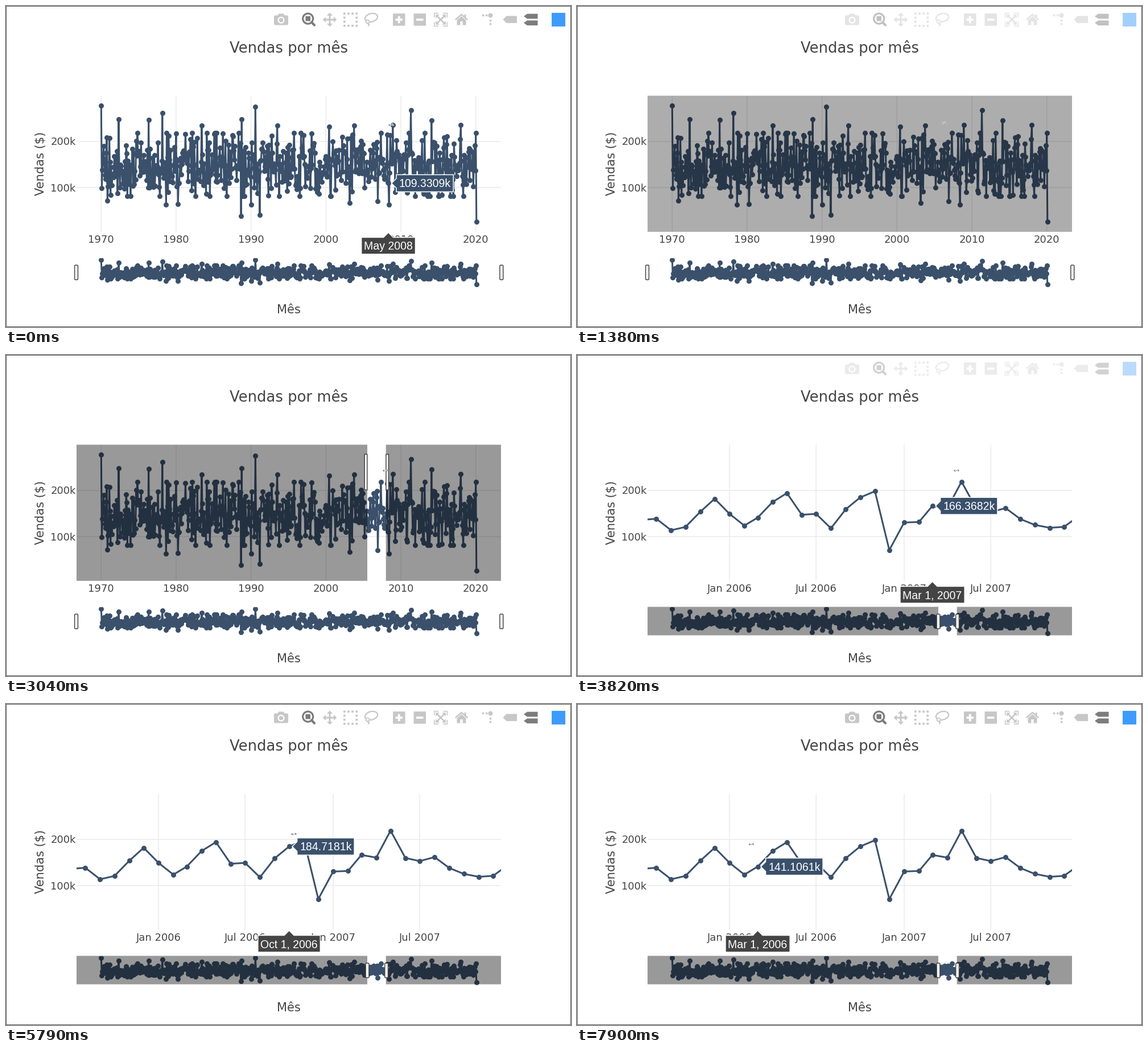
These frames come from a looping animation (993 by 564 pixels, 8 s). A matplotlib script:

```python
import numpy as np
import matplotlib.pyplot as plt
from matplotlib.animation import FuncAnimation
from matplotlib.patches import Circle, Ellipse, FancyBboxPatch, Polygon, Rectangle

plt.rcParams["path.snap"] = False

W, H, DPI = 993, 564, 64
STEP, LOOP = 40, 8000
PT = 72 / DPI
LEFT, RIGHT, TOP, BOTTOM = 124, 870, 157.6, 396.8
SL_TOP, SL_BOTTOM = 442.5, 492.5
WIN = 635, 667.7
BLUE, INK, GRID = "#3a506b", "#444444", "#ebebeb"
PALE, DARK = "#c7c7c7", "#7c7c7c"
NAMES = "Jan Feb Mar Apr May Jun Jul Aug Sep Oct Nov Dec".split()

# ---------- data: monthly sales in thousands, Jan 1970 to Feb 2020 ----------
months = np.arange("1970-01", "2020-03", dtype="datetime64[M]")
days = months.astype("datetime64[D]").astype(int)
rng = np.random.default_rng(5)
sales = np.clip(rng.normal(148, 37, len(months)), 82, 218).round(4)

# outstanding highs and lows
for month, k in {0: 278, 10: 72, 28: 248, 76: 247, 98: 262, 104: 63, 123: 64, 161: 235,
                 224: 38, 225: 248, 240: 63, 247: 275, 254: 41, 282: 235, 365: 232,
                 398: 67, 405: 235, 461: 63, 467: 236, 496: 268, 529: 246, 576: 236,
                 601: 26}.items():
    sales[month] = k

# the stretch that is zoomed into, from Jul 2005
NEAR = slice(426, 457)
run = np.array([136, 139, 114, 121, 154, 182, 149, 124, 141.1061, 175, 194, 147.2998, 149,
                117.924, 159, 185, 198, 71, 130.4579, 132, 166.3682, 161, 219, 160, 153,
                162, 138, 125, 119, 121, 144])
sales[NEAR] = np.where(run % 1, run, run + rng.uniform(-0.4, 0.4, len(run)).round(4))
sales[460] = 109.3309

x_full = 167.3 + days * 658.4 / 18262
x_zoom = 268 + (days - 13149) * 0.841
y_main = 400 - 0.81 * sales
y_slider = 446 + (y_main - 175) * 0.211

# ---------- pointer: it moves in bursts of equal steps that end at each key ----------
BEAT = 120
keys = [  # end time, steps, hovered month, x, y
    (0, 1, 460, 677, 209), (540, 3, 440, 649, 209), (840, 2, 424, 634, 206),
    (1230, 1, 424, 643, 205.5), (1740, 4, 424, 651, 204), (2400, 5, 424, 659, 203),
    (3040, 4, 424, 667, 203), (3820, 1, 446, 667, 203), (4670, 1, 448, 659, 204),
    (5030, 3, 444, 585.5, 217.5), (5400, 1, 444, 563, 217.5), (5790, 3, 441, 506, 228.5),
    (6300, 4, 439, 437, 235), (6570, 2, 437, 393, 239.5), (7320, 3, 435, 338, 243),
    (7900, 3, 434, 306.5, 246.5),
]


def pointer_at(t):
    """Hovered month and pointer position at time t."""
    state = np.array(keys[0][2:], float)
    for end, steps, *goal in keys[1:]:
        done = np.clip((t - end) // BEAT + steps, 0, steps)
        state = state + (np.array(goal) - state) * done / steps
    return int(round(state[0])), state[1], state[2]


# ---------- stage ----------
fig = plt.figure(figsize=(W / DPI, H / DPI), dpi=DPI, facecolor="white")
ax = fig.add_axes([0, 0, 1, 1])
ax.set_xlim(0, W)
ax.set_ylim(H, 0)
ax.axis("off")


def add(patch):
    ax.add_patch(patch)
    return patch


def box(x, y, w, h, color, r=0.0, z=2, edge="none", lw=0.0, alpha=None):
    style = dict(fc=color, ec=edge, lw=lw * PT, zorder=z, alpha=alpha)
    if r:
        return add(FancyBboxPatch((x, y), w, h, boxstyle=f"round,pad=0,rounding_size={r}", **style))
    return add(Rectangle((x, y), w, h, **style))


def poly(pts, color, z=2, edge="none", lw=0.0):
    return add(Polygon(pts, closed=True, fc=color, ec=edge, lw=lw * PT, zorder=z, joinstyle="miter"))


def disc(x, y, r, color):
    return add(Circle((x, y), r, fc=color, ec="none", zorder=2))


def stroke(xs, ys, color, lw, z=2, cap="butt"):
    return ax.plot(xs, ys, color=color, lw=lw * PT, zorder=z,
                   solid_capstyle=cap, solid_joinstyle="round")[0]


def label(x, y, s, size, ha="center", color=INK, font="DejaVu Sans", z=2, rot=0):
    return ax.text(x, y, s, fontsize=size * PT, ha=ha, va="baseline", color=color,
                   family=font, zorder=z, rotation=rot, rotation_mode="anchor")


def series(xs, ys, top, bottom):
    line = ax.plot(xs, ys, color=BLUE, lw=3 * PT, marker="o", ms=9 * PT, mew=0, zorder=2)[0]
    line.set_clip_path(Rectangle((LEFT, top), RIGHT - LEFT, bottom - top, transform=ax.transData))
    return line


def show(items, on):
    for item in items:
        item.set_visible(on)


def draw_toolbar():
    # camera
    box(471, 16.5, 25, 17, PALE, 2.5)
    poly([(477, 17), (479.5, 13.5), (487.5, 13.5), (490, 17)], PALE)
    disc(483.5, 24.8, 6, "white")
    disc(483.5, 24.8, 3.8, PALE)
    # magnifier, selected
    add(Circle((530.7, 22.2), 9, fc="none", ec=DARK, lw=3.2 * PT, zorder=2))
    box(526.4, 17.9, 8.6, 8.6, DARK)
    stroke([537, 542], [28.5, 33.7], DARK, 4.2, cap="round")
    # pan
    stroke([560, 578], [24, 24], PALE, 3)
    stroke([569, 569], [15, 33], PALE, 3)
    for a in np.arange(4) * np.pi / 2:
        c, s = np.cos(a), np.sin(a)
        head = [(12.3, 0), (7, -5), (7, 5)]
        poly([(569 + c * u - s * v, 24 + s * u + c * v) for u, v in head], PALE)
    # dotted selection box
    for i in range(4):
        for j in range(4):
            if i in (0, 3) or j in (0, 3):
                box(593 + 7.15 * i, 11.5 + 7.15 * j, 3.6, 3.6, PALE)
    # lasso
    add(Ellipse((642, 20.5), 22.5, 14.5, angle=-14, fc="none", ec=PALE, lw=2.3 * PT, zorder=2))
    add(Circle((635.5, 27.5), 3, fc="white", ec=PALE, lw=1.8 * PT, zorder=2))
    stroke([635, 638, 637], [30, 32.5, 35.5], PALE, 2.2)
    # plus and minus
    for x in (680, 716.5):
        box(x, 13.2, 21.5, 21.5, PALE, 1)
        stroke([x + 4.5, x + 17], [24, 24], "white", 3.8)
    stroke([690.75, 690.75], [17.7, 30.3], "white", 3.8)
    # autoscale
    for sx in (-1, 1):
        for sy in (-1, 1):
            stroke([764 + 4 * sx, 764 + 11.3 * sx, 764 + 11.3 * sx],
                   [24 + 11.3 * sy, 24 + 11.3 * sy, 24 + 4 * sy], PALE, 1.6)
            stroke([764, 764 + 6 * sx], [24, 24 + 6 * sy], PALE, 2.6)
            poly([(764 + 8.8 * sx, 24 + 8.8 * sy), (764 + 2.2 * sx, 24 + 8.8 * sy),
                  (764 + 8.8 * sx, 24 + 2.2 * sy)], PALE)
    # home
    stroke([789.8, 800.5, 811.2], [24.2, 15, 24.2], PALE, 2.6)
    poly([(792.5, 25), (800.5, 18), (808.5, 25), (808.5, 33.5), (792.5, 33.5)], PALE)
    box(798.3, 27, 4.4, 6.5, "white")
    box(805.5, 15, 3, 6, PALE)
    # spike lines
    for x, y in [(837, 14.8), (843, 14.8), (849.8, 24), (849.8, 30)]:
        box(x, y, 3.4, 3.4, PALE)
    disc(851.5, 16.5, 4, PALE)
    # hover tags
    for x, y, h, color in [(873.5, 17.5, 12.5, PALE), (910, 13.7, 8.7, DARK), (910, 25.4, 8.7, DARK)]:
        poly([(x, y + h / 2), (x + 6, y), (x + 24.5, y), (x + 24.5, y + h), (x + 6, y + h)], color)
    box(959, 12, 24, 24, "#3d9bff")


draw_toolbar()
veil = box(462, 6, 526, 36, "white", z=3, alpha=0)

box(0.5, 0.5, W - 1, H - 1, "none", z=9, edge="#555555", lw=1)
label(497.3, 81.5, "Vendas por mês", 25.9)
label(497.3, 539.5, "Mês", 21)
label(67, 277, "Vendas ($)", 21, rot=90)
for k in (100, 200):
    y = 400 - 0.81 * k
    stroke([LEFT, RIGHT], [y, y], GRID, 1.5, 1)
    label(122.7, y + 6.5, f"{k}k", 18, "right")


def ticks(xs, names):
    items = []
    for x, s in zip(xs, names):
        items += [stroke([x, x], [TOP, BOTTOM], GRID, 1.5, 1), label(x, 416.5, s, 18)]
    return items


decades = np.arange(0, 601, 120)
halves = np.arange(432, 451, 6)
full = ticks(x_full[decades], [str(1970 + m // 12) for m in decades])
full.append(series(x_full, y_main, TOP, BOTTOM))
zoom = ticks(x_zoom[halves], [f"{NAMES[m % 12]} {1970 + m // 12}" for m in halves])
zoom.append(series(x_zoom[NEAR], y_main[NEAR], TOP, BOTTOM))

# range slider
series(x_full, y_slider, SL_TOP, SL_BOTTOM)
zoom += [box(a, SL_TOP, b - a, SL_BOTTOM - SL_TOP, "black", z=3, alpha=0.4)
         for a, b in [(LEFT, WIN[0]), (WIN[1], RIGHT)]]
for group, ends in [(full, (123.5, 870.8)), (zoom, (635, 668.6))]:
    for x in ends:
        group.append(box(x - 2.9, 455.3, 5.8, 25.6, "white", 1.5, 4, INK, 1.5))

# drag selection
shades = [box(LEFT, TOP, WIN[0] - LEFT, BOTTOM - TOP, "black", z=3, alpha=0.4) for _ in range(2)]
grips = [box(WIN[0] - 4.8, 174.5, 4.5, 62.5, "white", z=4, edge=INK, lw=1.5) for _ in range(2)]

# hover labels
value_box = poly([(0, 0)] * 3, BLUE, 6, "white", 1.5)
date_box = poly([(0, 0)] * 3, INK, 6, "white", 1.5)
value_text = label(0, 0, "", 19.5, "left", "white", "Liberation Sans", 7)
date_text = label(0, 428.5, "", 19.5, "center", "white", "Liberation Sans", 7)
hover = [value_box, date_box, value_text, date_text]

# resize pointer
shape_x = np.array([-2.4, -4.2, -2.4, -4.2, 4.2, 2.4, 4.2, 2.4])
shape_y = np.array([-1.6, 0, 1.6, 0, 0, -1.6, 0, 1.6])
pointer = [stroke(shape_x, shape_y, "white", 1.8, 8), stroke(shape_x, shape_y, "#777777", 0.7, 8)]


def width(text):
    return text.get_window_extent().width * DPI / fig.dpi


def place_hover(m, zoomed):
    x, y = (x_zoom if zoomed else x_full)[m], y_main[m]
    value_text.set_text(f"{sales[m]:.4f}".rstrip("0").rstrip(".") + "k")
    day = "1, " if zoomed else ""
    date_text.set_text(f"{NAMES[m % 12]} {day}{1970 + m // 12}")
    left = x + 14
    value_text.set_position((left + 4.5, y + 7))
    date_text.set_x(x)
    right = left + width(value_text) + 9
    value_box.set_xy([(x + 5.5, y), (left, y - 8.5), (left, y - 15), (right, y - 15),
                      (right, y + 15), (left, y + 15), (left, y + 8.5)])
    half = width(date_text) / 2 + 4.5
    date_box.set_xy([(x, 398), (x + 8.5, 406.5), (x + half, 406.5), (x + half, 436),
                     (x - half, 436), (x - half, 406.5), (x - 8.5, 406.5)])


def bar_opacity(t):
    return np.interp(t, [1350, 1390, 1640, 3790, 3830, 3970], [1, 0.47, 0, 0, 0.35, 1])


def update(frame):
    t = frame * STEP + STEP - 10
    m, cx, cy = pointer_at(t)
    zoomed = t >= 3820
    dragging = 1500 <= t < 3820
    show(full, not zoomed)
    show(zoom, zoomed)
    veil.set_alpha(1 - bar_opacity(t))

    edge = cx + 0.7 if dragging else WIN[0]
    shades[1].set_x(edge)
    shades[1].set_width(RIGHT - edge)
    grips[1].set_x(edge + 0.2)
    for shade in shades:
        shade.set_alpha(0.4 if dragging else 0.32)
    show(shades, 1380 <= t < 3820)
    show(grips, dragging)

    hovering = t < 1230 or zoomed
    show(hover, hovering)
    if hovering:
        place_hover(m, zoomed)
    for line in pointer:
        line.set_data(shape_x + cx, shape_y + cy)
    return []


anim = FuncAnimation(fig, update, frames=LOOP // STEP, interval=STEP,
                     init_func=lambda: update(0), repeat=True, repeat_delay=0, blit=False)
plt.show()
```
